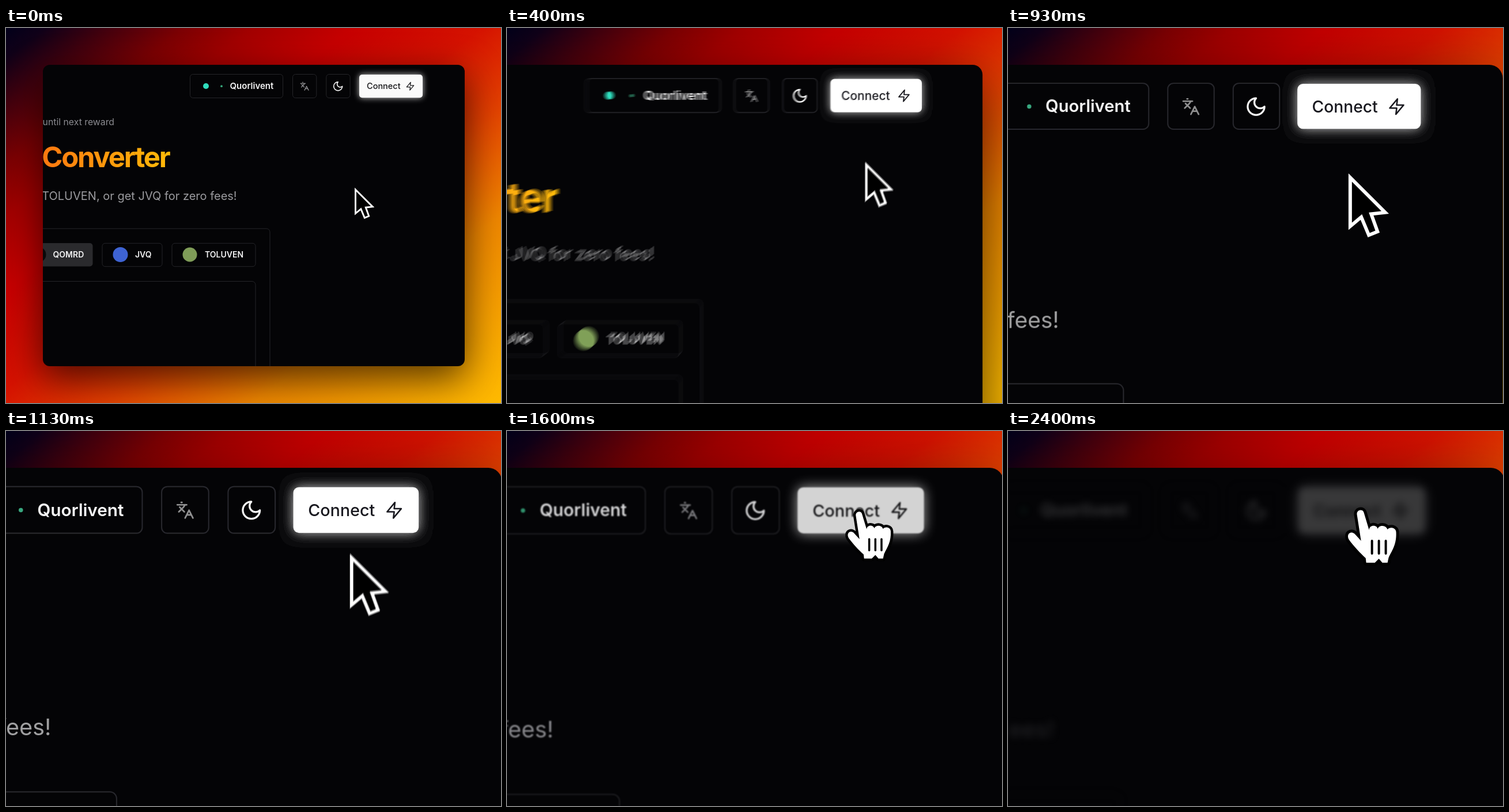
An HTML page with a canvas for the animation above (2.47 s loop, 859 by 652 pixels).

```html
<!DOCTYPE html>
<html lang="en">
<head>
<meta charset="utf-8">
<title>Converter zoom</title>
<style>
  html, body { margin: 0; width: 100%; height: 100%; overflow: hidden; background: #040406; }
  canvas { display: block; width: 859px; height: 652px; }
</style>
</head>
<body>
<canvas id="stage" width="859" height="652"></canvas>
<script>
const W = 859, H = 652, LOOP = 2470;
const PIVOT = { x: 730, y: 64 };
const DARK = '#040406', LINE = '#252529';
const HOVER_AT = 1200, MODAL_AT = 1560;

const ctx = document.getElementById('stage').getContext('2d');
const pen = offscreen(), blend = offscreen();

function offscreen() {
  const canvas = document.createElement('canvas');
  canvas.width = W;
  canvas.height = H;
  return canvas.getContext('2d');
}

const ICONS = {
  moon: new Path2D('M12 3a6 6 0 0 0 9 9 9 9 0 1 1-9-9Z'),
  zap: new Path2D('M13 2 3 14h9l-1 8 10-12h-9l1-8z'),
  languages: new Path2D('m5 8 6 6M4 14l6-6 2-3M2 5h12M7 2h1M22 22l-5-10-5 10M14 18h6')
};
const ARROW = new Path2D('M1.5 3V44.5L10.9 36.6 17.3 52 24.7 49 19.3 34 31.2 32.7Z');
const HAND = new Path2D(
  'M-6 10C-8 1 4-2 6 6L15 36C15 27 28 26 30 34C32 27 44 27 47 35' +
  'C50 30 62 31 62 40C63 60 56 70 49 84L47 93H38L32 86 25 93H10L9 85' +
  'C0 77-12 64-20 53C-26 42-15 36-9 44L1 55Z');
const HAND_LINES = new Path2D('M20 55V77M32 55V77M44 55V77');

const CURSOR_X = [[0, 605], [400, 654.7], [670, 659], [930, 658.5], [1420, 669.8], [1800, 670.7]];
const CURSOR_Y = [[0, 278], [400, 181.5], [670, 173.8], [930, 161.5], [1420, 102.9], [1800, 100.2]];
const CURSOR_SIZE = [[500, 1], [650, 0.91], [930, 1.05], [1100, 1],
  [1450, 1], [1560, 0.88], [1800, 1.03], [2100, 1]];

const clamp = v => Math.min(1, Math.max(0, v));
const smooth = v => v * v * (3 - 2 * v);

function tween(keys, t) {
  const next = keys.findIndex(k => k[0] > t);
  if (next === 0) return keys[0][1];
  if (next < 0) return keys[keys.length - 1][1];
  const [t0, a] = keys[next - 1], [t1, b] = keys[next];
  return a + (b - a) * smooth((t - t0) / (t1 - t0));
}

// Critically damped spring from 0 to 1.
function spring(t) {
  const x = Math.max(0, t - 158) * 0.0062;
  return 1 - (1 + x) * Math.exp(-x);
}
const zoomAt = t => 1 + 0.995 * spring(t);

function camera(c, s, shift = 0) {
  c.setTransform(s, 0, 0, s, PIVOT.x * (1 - s) + shift, PIVOT.y * (1 - s));
}

function clear(c) {
  c.setTransform(1, 0, 0, 1, 0, 0);
  c.clearRect(0, 0, W, H);
}

function rounded(c, x, y, w, h, r) {
  c.beginPath();
  c.roundRect(x, y, w, h, r);
}

function frame(x, y, w, h, r = 5) {
  rounded(pen, x, y, w, h, r);
  pen.strokeStyle = LINE;
  pen.lineWidth = 1;
  pen.stroke();
}

function disc(x, y, r, color) {
  pen.beginPath();
  pen.arc(x, y, r, 0, Math.PI * 2);
  pen.fillStyle = color;
  pen.fill();
}

function label(text, x, y, size, weight, color, align = 'left', spacing = 0) {
  pen.font = `${weight} ${size}px Inter, sans-serif`;
  pen.letterSpacing = spacing + 'px';
  pen.textAlign = align;
  pen.fillStyle = color;
  pen.fillText(text, x, y);
}

function icon(name, x, y, size, color, width) {
  pen.save();
  pen.translate(x, y);
  pen.scale(size / 24, size / 24);
  pen.translate(-12, -12);
  pen.strokeStyle = color;
  pen.lineWidth = width;
  pen.lineCap = pen.lineJoin = 'round';
  pen.stroke(ICONS[name]);
  pen.restore();
}

function drawToolbar(s, hover) {
  frame(319.5, 80.5, 161, 41);
  disc(347, 101, 5, '#2fdcbc');
  disc(374, 101.2, 1.9, '#37a67c');
  label('Quorlivent', 388.5, 106.3, 15, 600, '#f4f4f5');

  frame(497.5, 80.5, 41.3, 41);
  icon('languages', 518.1, 101.3, 16.5, '#8d8d90', 2);
  frame(555.8, 80.5, 41.3, 41);
  icon('moon', 576.2, 101.3, 20, '#f4f4f5', 2);

  pen.save();
  pen.shadowColor = 'rgba(255,255,255,.75)';
  pen.shadowBlur = 11 * s;
  pen.fillStyle = hover ? '#f2f2f2' : '#fafafa';
  rounded(pen, 613, 81, 110, 40.2, 5);
  pen.fill();
  pen.restore();
  label('Connect', 626, 106.4, 14.5, 500, '#18181b');
  icon('zap', 701.5, 101.3, 16.5, '#18181b', 1.9);
}

function drawPage() {
  label('until next reward', 188, 169, 15.8, 400, '#8b8b90', 'right');

  const amber = pen.createLinearGradient(50, 0, 285, 0);
  amber.addColorStop(0, '#ff7410');
  amber.addColorStop(1, '#ffba08');
  label('Converter', 283.5, 241.5, 49, 700, amber, 'right', -2.2);

  label('TOLUVEN, or get JVQ for zero fees!', 400.6, 299, 20, 400, '#9b9b9f', 'right');

  frame(0, 348.8, 458, 320, 6);
  rounded(pen, 20, 374, 130.5, 40.5, 5);
  pen.fillStyle = '#2a2a2d';
  pen.fill();
  disc(56, 394, 13.5, '#09090a');
  label('QOMRD', 81.5, 399.2, 14, 600, '#f4f4f5');

  frame(167, 374.3, 104, 40.4);
  disc(198.5, 394, 13, '#3e63d3');
  label('JVQ', 224, 399.2, 14, 600, '#f4f4f5');

  frame(288, 374.3, 145, 40.4);
  disc(319, 394, 12.5, '#7f9c58');
  label('TOLUVEN', 345, 399.2, 14, 600, '#f4f4f5');

  frame(0, 440.5, 433, 240, 6);
}

function drawCursor(c, t) {
  const s = zoomAt(t), size = tween(CURSOR_SIZE, t);
  c.save();
  camera(c, s);
  c.translate(tween(CURSOR_X, t), tween(CURSOR_Y, t));
  c.scale(size, size);
  if (t < HOVER_AT) {
    c.fillStyle = '#000';
    c.fill(ARROW);
    c.strokeStyle = '#fff';
    c.lineWidth = 2.9;
    c.stroke(ARROW);
  } else {
    c.scale(0.5, 0.5);
    c.lineJoin = c.lineCap = 'round';
    c.strokeStyle = '#000';
    c.lineWidth = 10;
    c.stroke(HAND);
    c.fillStyle = '#fff';
    c.fill(HAND);
    c.lineWidth = 4;
    c.stroke(HAND_LINES);
  }
  c.restore();
}

function drawContent(t, shift) {
  const s = zoomAt(t);
  clear(pen);
  camera(pen, s, shift);
  drawToolbar(s, t >= HOVER_AT);
  drawPage();
}

function drawBackdrop(p) {
  ctx.save();
  ctx.scale(W / (1 + 0.1 * p), H);
  const g = ctx.createLinearGradient(0, 0, 1, 1);
  [[0, '#02001a'], [0.04, '#100018'], [0.1, '#40000e'], [0.18, '#7c0003'], [0.25, '#a20000'],
    [0.35, '#c60000'], [0.48, '#d51200'], [0.6, '#e34000'], [0.75, '#ee8600'], [1, '#ffbb00']]
    .forEach(([at, color]) => g.addColorStop(at, color));
  ctx.fillStyle = g;
  ctx.fillRect(0, 0, 2, 1);
  ctx.restore();
}

function drawWindow(s) {
  camera(ctx, s);
  rounded(ctx, 64, 64, 732, 524, 12);
  ctx.shadowColor = 'rgba(0,0,0,.66)';
  ctx.shadowBlur = 64 * s;
  ctx.shadowOffsetY = 20 * s;
  ctx.fillStyle = DARK;
  ctx.fill();
  ctx.shadowColor = 'transparent';
  ctx.clip();
  ctx.setTransform(1, 0, 0, 1, 0, 0);
}

// Average several moments for motion blur.
function drawMoving(t) {
  const count = t > 20 && t < 1300 ? 8 : 1;
  clear(blend);
  blend.globalCompositeOperation = 'lighter';
  blend.globalAlpha = 1 / count;
  for (let i = 0; i < count; i++) {
    const moment = t + ((i + 0.5) / count - 0.5) * 13;
    drawContent(moment, 0);
    drawCursor(pen, moment);
    blend.drawImage(pen.canvas, 0, 0);
  }
  ctx.drawImage(blend.canvas, 0, 0);
}

function drawModal(t, amount) {
  drawContent(t, 7.5);
  ctx.filter = `blur(${6.5 * amount}px)`;
  ctx.globalAlpha = 1 - 0.78 * amount;
  ctx.drawImage(pen.canvas, 0, 0);
  ctx.filter = 'none';
  ctx.globalAlpha = 1;
  drawCursor(ctx, t);
}

function render(t) {
  const modal = smooth(clamp((t - MODAL_AT) / 160));
  ctx.setTransform(1, 0, 0, 1, 0, 0);
  drawBackdrop(spring(t));
  ctx.save();
  drawWindow(zoomAt(t));
  if (modal > 0) drawModal(t, modal);
  else drawMoving(t);
  ctx.restore();
}

const start = performance.now();
function tick() {
  render((performance.now() - start) % LOOP);
  requestAnimationFrame(tick);
}
tick();
</script>
</body>
</html>
```
